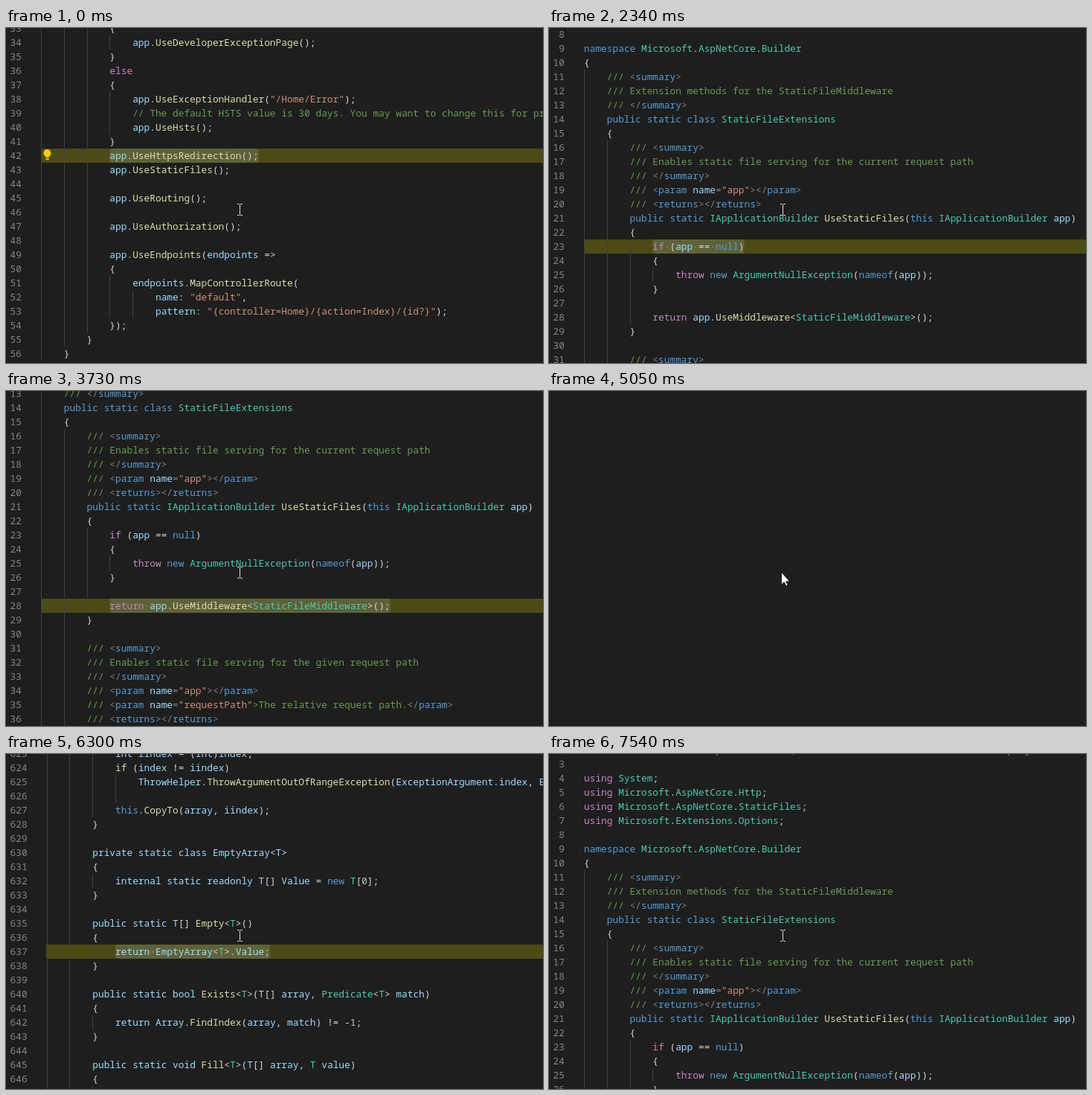
Animation of 722 by 450 pixels, one loop 8000 ms. Source, as an HTML page:

```html
<!DOCTYPE html>
<html lang="en">
<head>
<meta charset="utf-8">
<title>Stepping through code</title>
<style>
  html, body { margin: 0; width: 100%; height: 100%; overflow: hidden; background: #1e1e1e; }
  svg { display: block; width: 722px; height: 450px; }
  text { font: 12.83px "Noto Sans Mono", "DejaVu Sans Mono", monospace; white-space: pre; fill: #d4d4d4; font-variant-ligatures: none; }
  .number { fill: #858585; text-anchor: end; }
  .comment { fill: #6a9955; }
  .string { fill: #ce9178; }
  .control { fill: #c586c0; }
  .keyword { fill: #569cd6; }
  .call { fill: #dcdcaa; }
  .type { fill: #4ec9b0; }
  .name { fill: #9cdcfe; }
  .digit { fill: #b5cea8; }
  .mark { fill: #808080; }
  .guide { fill: #404040; shape-rendering: crispEdges; }
  .plain .code, .plain .code tspan { fill: #d4d4d4; }
  .plain .guide { display: none; }
</style>
</head>
<body>
<svg id="stage" viewBox="0 0 722 450">
  <rect width="722" height="450" fill="#1e1e1e"/>
  <g id="pages"></g>
  <g id="bulb">
    <path d="M55.5 163a5 5 0 0 0-3 9q.8.8.8 2h4.4q0-1.2.8-2a5 5 0 0 0-3-9z" fill="#fc0"/>
    <path d="M53.3 175h4.4v1.2l-1 1h-2.4l-1-1z" fill="#d8b12a"/>
  </g>
  <path id="beam" d="M311 236.5h2.5l1 1 1-1h2.5M314.5 237.5v13M311 251.5h2.5l1-1 1 1h2.5" fill="none" stroke="#e0e0e0"/>
  <path id="arrow" d="M312.5 243.5v16.5l3.7-3.4 2.5 5.4 2.3-1-2.4-5.2h5z" fill="#fff" stroke="#111" stroke-width=".8"/>
</svg>
<script>
const CHAR = 7.697, ROW = 19, LOOP = 8000;

const startup = `            {
                app.UseDeveloperExceptionPage();
            }
            else
            {
                app.UseExceptionHandler("/Home/Error");
                // The default HSTS value is 30 days. You may want to change this for production scenarios.
                app.UseHsts();
            }
            app.UseHttpsRedirection();
            app.UseStaticFiles();

            app.UseRouting();

            app.UseAuthorization();

            app.UseEndpoints(endpoints =>
            {
                endpoints.MapControllerRoute(
                    name: "default",
                    pattern: "{controller=Home}/{action=Index}/{id?}");
            });
        }
    }
}`;

const extensions = `
// Licensed under the Apache License, Version 2.0. See License.txt in the project root for license information.

using System;
using Microsoft.AspNetCore.Http;
using Microsoft.AspNetCore.StaticFiles;
using Microsoft.Extensions.Options;

namespace Microsoft.AspNetCore.Builder
{
    /// <summary>
    /// Extension methods for the StaticFileMiddleware
    /// </summary>
    public static class StaticFileExtensions
    {
        /// <summary>
        /// Enables static file serving for the current request path
        /// </summary>
        /// <param name="app"></param>
        /// <returns></returns>
        public static IApplicationBuilder UseStaticFiles(this IApplicationBuilder app)
        {
            if (app == null)
            {
                throw new ArgumentNullException(nameof(app));
            }

            return app.UseMiddleware<StaticFileMiddleware>();
        }

        /// <summary>
        /// Enables static file serving for the given request path
        /// </summary>
        /// <param name="app"></param>
        /// <param name="requestPath">The relative request path.</param>
        /// <returns></returns>`;

const arrays = `            int iindex = (int)index;
            if (index != iindex)
                ThrowHelper.ThrowArgumentOutOfRangeException(ExceptionArgument.index, ExceptionResource.HugeArray);

            this.CopyTo(array, iindex);
        }

        private static class EmptyArray<T>
        {
            internal static readonly T[] Value = new T[0];
        }

        public static T[] Empty<T>()
        {
            return EmptyArray<T>.Value;
        }

        public static bool Exists<T>(T[] array, Predicate<T> match)
        {
            return Array.FindIndex(array, match) != -1;
        }

        public static void Fill<T>(T[] array, T value)
        {
            if (array == null)`;

const docRule = /(?<string>"[^"]*")|(?<keyword>(?<=<\/?)\w+)|(?<name>\w+(?==))|(?<mark>[<>=]|(?<=<)\/)/g;
const codeRule = new RegExp([
  '(?<comment>//.*)',
  '(?<string>"[^"]*")',
  '(?<control>\\b(?:if|else|return|throw|using)\\b)',
  '(?<keyword>\\b(?:namespace|public|static|class|this|new|null|nameof)\\b)',
  '(?<type>(?<=new )\\w+|[A-Z]\\w*(?![\\w(]|<S))',
  '(?<call>\\w+(?=\\(|<S))',
  '(?<name>[a-z]\\w*)'
].join('|'), 'g');
// The large file is only partly tokenized, so most words look like variables.
const looseRule = /(?<keyword>\b(?:this|new)\b)|(?<type>Predicate|(?<=<)T(?=>.)|(?<=new )T|T(?= value))|(?<call>\w+(?= ?\(|<T>\())|(?<digit>\b\d+)|(?<name>[A-Za-z]\w*)/g;

const $ = id => document.getElementById(id);

function add(parent, tag, attrs = {}, text = '') {
  const el = document.createElementNS('http://www.w3.org/2000/svg', tag);
  for (const key in attrs) el.setAttribute(key, attrs[key]);
  el.textContent = text;
  return parent.appendChild(el);
}

function addCode(parent, x, y, code, rule) {
  const isDoc = code.startsWith('///');
  const text = add(parent, 'text', { x, y, class: isDoc ? 'code comment' : 'code' });
  let end = 0;
  for (const match of code.matchAll(isDoc ? docRule : rule)) {
    text.append(code.slice(end, match.index));
    const kind = Object.keys(match.groups).find(key => match.groups[key] !== undefined);
    add(text, 'tspan', { class: kind }, match[0]);
    end = match.index + match[0].length;
  }
  text.append(code.slice(end));
}

const indentOf = line => line.search(/\S/);

function guideDepth(lines, i) {
  if (lines[i]) return indentOf(lines[i]);
  const above = indentOf(lines.slice(0, i).reverse().find(Boolean) || 'x');
  const below = indentOf(lines.slice(i).find(Boolean) || 'x');
  return above === below ? above : Math.min(above, below) + 4;
}

function makePage(source, first, top, left, rule) {
  const lines = source.split('\n');
  const group = add($('pages'), 'g');
  const glow = add(group, 'g');
  lines.forEach((line, i) => {
    const y = top + i * ROW;
    for (let col = 0; col < guideDepth(lines, i); col += 4)
      add(group, 'rect', { class: 'guide', x: Math.round(left + col * CHAR), y, width: 1, height: ROW });
    add(group, 'text', { class: 'number', x: left - 26, y: y + 14 }, first + i);
    if (line) addCode(group, left + indentOf(line) * CHAR, y + 14, line.trim(), rule);
  });

  function highlight(number) {
    glow.replaceChildren();
    if (!number) return;
    const line = lines[number - first], code = line.trim();
    const y = top + (number - first) * ROW, x = left + indentOf(line) * CHAR;
    add(glow, 'rect', { x: Math.floor(left), y, width: 722, height: ROW, fill: '#4b4b18' });
    add(glow, 'rect', { x, y, width: code.length * CHAR, height: ROW, rx: 3, fill: '#5f613a' });
    [...code].forEach((char, i) => {
      if (char === ' ')
        add(glow, 'circle', { cx: x + (i + .5) * CHAR, cy: y + 10, r: 1, fill: '#e3e4e2', opacity: .3 });
    });
  }
  return { group, highlight };
}

const pages = {
  startup: makePage(startup, 33, -9, 47, codeRule),
  extensions: makePage(extensions, 1, -34, 47, codeRule),
  arrays: makePage(arrays, 623, -10, 54.7, looseRule)
};

const states = [
  { at: 0, page: 'startup', line: 42, bulb: 0 },
  { at: 70, page: 'startup', line: 43, bulb: 0 },
  { at: 390, page: 'startup', line: 43, bulb: ROW },
  { at: 850 },
  { at: 1480, page: 'extensions', line: 23 },
  { at: 2340, page: 'extensions', line: 23, scroll: 100 },
  { at: 2720, page: 'extensions', line: 23, scroll: 150 },
  { at: 3100, page: 'extensions', line: 23, scroll: 200 },
  { at: 3650, page: 'extensions', scroll: 200 },
  { at: 3730, page: 'extensions', line: 28, scroll: 200 },
  { at: 4340, page: 'arrays', line: 637 },
  { at: 5050 },
  { at: 5510, page: 'extensions', plain: true },
  { at: 5590, page: 'extensions', line: 28 },
  { at: 6300, page: 'arrays', line: 637 },
  { at: 6680 },
  { at: 7380, page: 'extensions', plain: true },
  { at: 7460, page: 'extensions', line: 28 }
];

const show = (el, visible) => el.setAttribute('display', visible ? 'inline' : 'none');
let current;

function render(time) {
  const state = states.findLast(s => s.at <= time % LOOP);
  if (state === current) return;
  current = state;
  for (const name in pages) {
    const { group, highlight } = pages[name];
    show(group, name === state.page);
    if (name !== state.page) continue;
    highlight(state.line);
    group.setAttribute('transform', `translate(0 ${-(state.scroll || 0)})`);
    group.classList.toggle('plain', !!state.plain);
  }
  show($('bulb'), state.bulb !== undefined);
  $('bulb').setAttribute('transform', `translate(0 ${state.bulb || 0})`);
  show($('beam'), state.page);
  show($('arrow'), !state.page);
}

const start = performance.now();
function tick() {
  render(performance.now() - start);
  requestAnimationFrame(tick);
}
tick();
</script>
</body>
</html>
```
